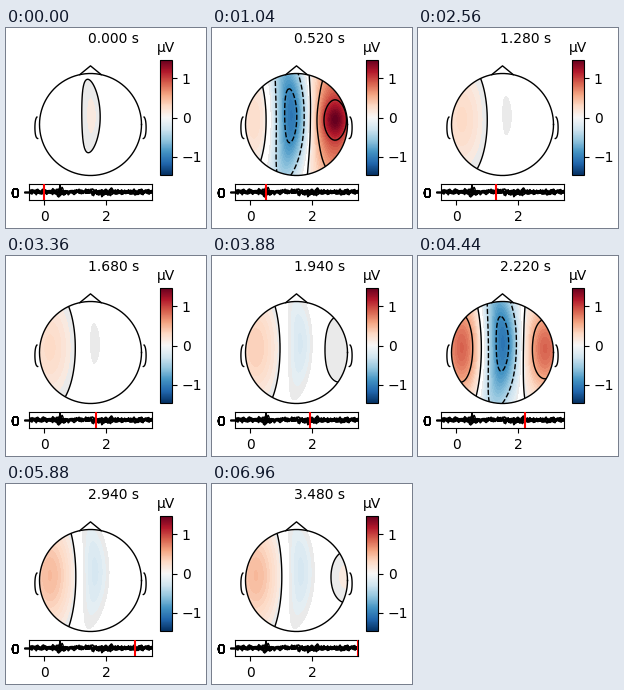
These frames come from a looping animation (200x200 px, 7000 ms). A matplotlib script:

```python
import numpy as np
import matplotlib.pyplot as plt
from matplotlib.animation import FuncAnimation
from matplotlib.cm import ScalarMappable
from matplotlib.colors import ListedColormap, Normalize
from matplotlib.patches import Circle

SIZE, DPI = 200, 100
FRAMES, INTERVAL, STEP = 175, 40, 0.02
CX, CY, R = 84.5, 96.5, 51
VMAX = 1.46
LEVELS = 0.07 + 0.48 * np.arange(-2, 4)


def px_axes(x, y, w, h):
    """Axes placed by pixel box, measured from the top left."""
    return fig.add_axes([x / SIZE, 1 - (y + h) / SIZE, w / SIZE, h / SIZE])


def pulse(t, centre, width):
    return np.exp(-((t - centre) / width) ** 2)


def bump(x, y, wx, wy):
    return np.exp(-0.5 * (((X - x) / wx) ** 2 + ((Y - y) / wy) ** 2))


def field(t):
    """Scalp voltage: left, midline and right sources driven by two bursts."""
    start = np.exp(-t / 0.2)
    early, late = pulse(t, 0.52, 0.12), pulse(t, 2.22, 0.2)
    tail = pulse(t, 3.6, 0.2)
    rise = 1 / (1 + np.exp(-(t - 2.22) / 0.1))

    left = 0.28 * (1 - start) + 0.18 * rise + 0.48 * late
    mid = 0.24 * start - 0.1 - 0.14 * rise - early - 0.9 * late
    mid_x = 86 - 3 * start - 8.5 * early - 3.5 * late
    mid_w = min(12, 5 + 20 * abs(mid))
    bend = 2 - 2 * ((Y - 90) / 30) ** 2

    z = left * bump(43, 92, 16 - 2 * (early + late), 37)
    z += mid * bump(mid_x + bend, 88, mid_w, 4 * mid_w)
    z += early * (bump(123, 92, 17, 50) + 0.45 * bump(123, 92, 10, 12))
    z += 0.85 * late * bump(127, 93, 15, 32)
    z += 0.2 * tail * bump(134, 93, 13, 22)
    return z


def banded_cmap(n=61):
    """Stepped map whose middle fades to grey and then white."""
    colors = plt.get_cmap("RdBu_r")(np.linspace(0, 1, n))
    dist = abs(np.arange(n) - n // 2)
    colors[dist == 2, :3] = 0.92
    colors[dist < 2, :3] = 1
    return ListedColormap(colors)


def draw_head(ax):
    a = np.linspace(0, 2 * np.pi, 181)
    b = np.linspace(0.1, 0.95, 30) * np.pi
    ear_x, ear_y = 1 + 0.09 * np.sqrt(np.sin(b)), -0.06 + 0.217 * np.cos(b)
    parts = [(np.cos(a), np.sin(a)),
             (np.array([-0.21, 0, 0.21]), np.array([0.978, 1.15, 0.978])),
             (ear_x, ear_y), (-ear_x, ear_y)]
    for x, y in parts:
        ax.plot(CX + R * x, CY - R * y, color="k", lw=1, zorder=5)


def draw_traces(ax):
    rng = np.random.default_rng(4)
    t = np.linspace(-0.5, 3.5, 240)
    gain = 1 + 1.5 * pulse(t, 0.54, 0.11) + 0.7 * pulse(t, 2, 0.13)
    for _ in range(8):
        noise = np.convolve(rng.normal(size=t.size + 4), np.ones(5) / 5, "valid")
        ax.plot(t, 2.5 * noise * gain, color="k", lw=1)


plt.rcParams.update({"font.family": "DejaVu Sans", "font.size": 10})
fig = plt.figure(figsize=(SIZE / DPI, SIZE / DPI), dpi=DPI, facecolor="white")

ax = px_axes(0, 0, SIZE, SIZE)
X, Y = np.meshgrid(np.linspace(CX - R, CX + R, 103),
                   np.linspace(CY - R, CY + R, 103))
norm = Normalize(-VMAX, VMAX)
im = ax.imshow(field(0), cmap=banded_cmap(), norm=norm, aspect="auto",
               extent=(CX - R, CX + R, CY + R, CY - R),
               interpolation="bilinear")
disc = Circle((CX, CY), R, transform=ax.transData)
im.set_clip_path(disc)
draw_head(ax)
ax.axis("off")
label = ax.text(107.3, 15, "", ha="center", va="baseline")

cax = px_axes(154, 32, 12, 115)
fig.colorbar(ScalarMappable(norm, "RdBu_r"), cax=cax, ticks=[-1, 0, 1])
cax.set_title("µV", fontsize=10)

tax = px_axes(23, 156, 123.4, 16)
draw_traces(tax)
tax.set(xlim=(-0.5, 3.5), ylim=(-8, 8), xticks=[0, 2])
# one tick per overlaid channel
tax.set_yticks([0] * 20, ["0"] * 20)
cursor = tax.axvline(0, color="red", lw=1.5, zorder=6)

lines = []


def update(i):
    t = i * STEP
    z = field(t)
    im.set_data(z)
    while lines:
        lines.pop().remove()
    cs = ax.contour(X, Y, z, levels=LEVELS, colors="k", linewidths=1)
    cs.set_clip_path(disc)
    lines.append(cs)
    ax.set(xlim=(0, SIZE), ylim=(SIZE, 0))
    label.set_text(f"{t:.3f} s")
    cursor.set_xdata([t, t])
    return im, label, cursor


anim = FuncAnimation(fig, update, frames=FRAMES, interval=INTERVAL,
                     init_func=lambda: update(0), repeat=True,
                     repeat_delay=0, blit=False)
plt.show()
```
